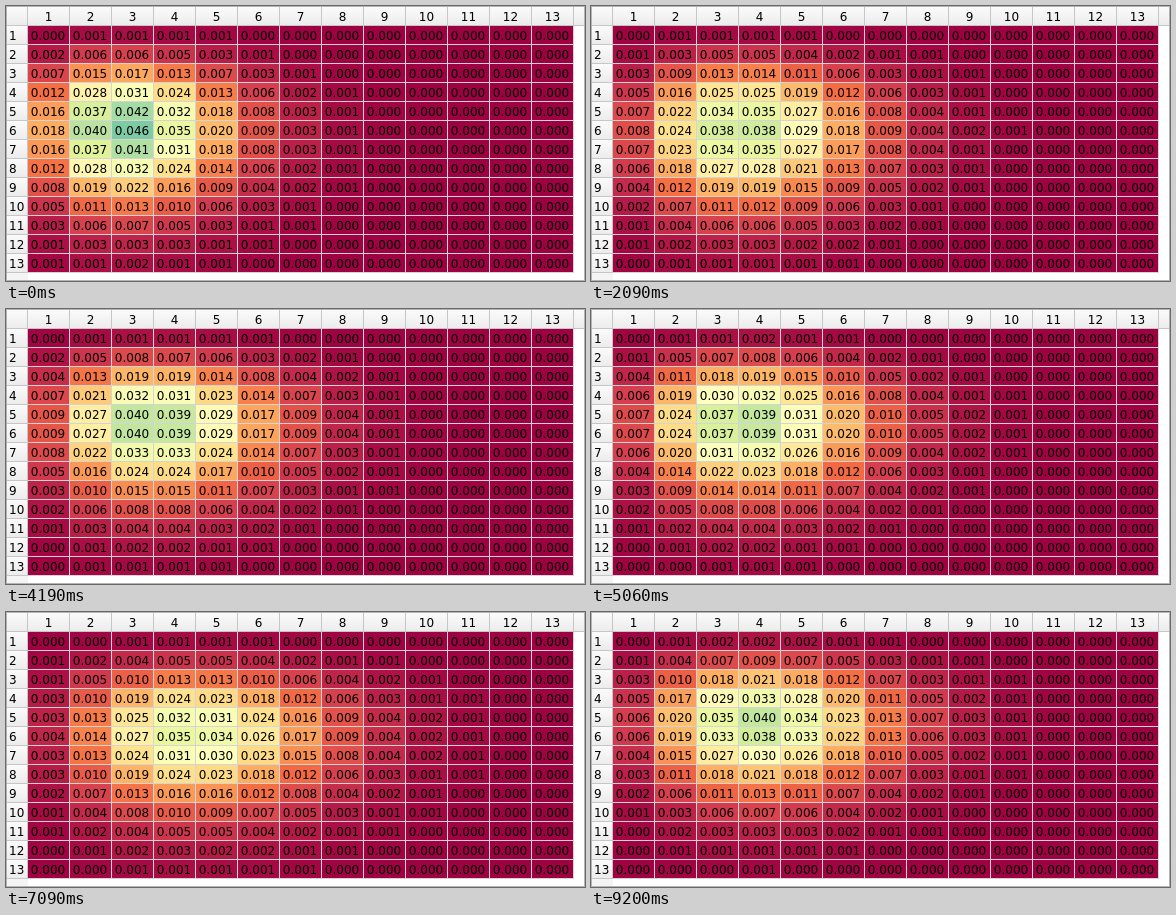
An HTML page with a canvas that plays this animation: 579 px wide and 275 px high, repeating every 9.3 s.

```html
<!DOCTYPE html>
<html lang="en">
<head>
<meta charset="utf-8">
<title>Poisson probability table</title>
<style>
  html, body { margin: 0; width: 579px; height: 275px; overflow: hidden; background: #fff; }
  canvas { display: block; }
</style>
</head>
<body>
<canvas id="stage" width="579" height="275"></canvas>
<script>
const ctx = document.getElementById('stage').getContext('2d');
const W = 579, H = 275, N = 13;
const LEFT = 22, TOP = 20, CELL_W = 42, CELL_H = 19;
const LOOP = 9300, STEP = 46.2, LAST = 199;
const MAX_P = 0.06;

// Means of the two Poisson variables: [step, mean]
const colMean = [[0, 2.27], [23, 2.86], [33, 3.14], [41, 3.1], [50, 3.02], [57, 3.1],
  [65, 2.98], [75, 3.1], [83, 3.01], [90, 2.965], [103, 3.03], [127, 3.55], [139, 4.24],
  [146, 4.24], [153, 3.86], [168, 3.85], [178, 3.55], [187, 3.66], [199, 3.439]];
const rowMean = [[0, 5.41], [23, 5.42], [65, 5.6], [90, 5.02], [127, 4.94], [153, 5.38], [199, 4.8]];

const spectral = ['9e0142', 'd53e4f', 'f46d43', 'fdae61', 'fee08b', 'ffffbf',
  'e6f598', 'abdda4', '66c2a5', '3288bd', '5e4fa2']
  .map(hex => [0, 2, 4].map(i => parseInt(hex.slice(i, i + 2), 16)));

function valueAt(knots, step) {
  const i = Math.max(1, knots.findIndex(k => k[0] >= step));
  const [s0, v0] = knots[i - 1], [s1, v1] = knots[i];
  return v0 + (v1 - v0) * (step - s0) / (s1 - s0);
}

function poisson(mean) {
  const p = [Math.exp(-mean)];
  for (let k = 1; k < N; k++) p.push(p[k - 1] * mean / k);
  return p;
}

function colour(p) {
  const x = Math.min(p / MAX_P, 0.9999) * (spectral.length - 1);
  const i = Math.floor(x), f = x - i;
  return `rgb(${spectral[i].map((c, k) => Math.round(c + (spectral[i + 1][k] - c) * f))})`;
}

function rect(x, y, w, h, fill) {
  ctx.fillStyle = fill;
  ctx.fillRect(x, y, w, h);
}

function text(s, x, y, align) {
  ctx.fillStyle = '#000';
  ctx.textAlign = align;
  ctx.fillText(s, x, y);
}

function header(x, y, w, h) {
  const g = ctx.createLinearGradient(0, y, 0, y + h);
  g.addColorStop(0, '#fbfbfb');
  g.addColorStop(1, '#ebebeb');
  rect(x, y, w, h, g);
  rect(x + w - 1, y, 1, h, '#c6c6c6');
  rect(x, y + h - 1, w, 1, '#c6c6c6');
}

function drawFrame() {
  rect(0, 0, W, H, '#fff');
  rect(1, TOP, LEFT - 1, H - TOP, '#f4f4f4');
  header(1, 1, LEFT - 1, TOP - 1);
  header(LEFT + N * CELL_W, 1, W - LEFT - N * CELL_W, TOP - 1);
  for (let k = 0; k < N; k++) {
    header(LEFT + k * CELL_W, 1, CELL_W, TOP - 1);
    text(k + 1, LEFT + k * CELL_W + 20.5, 15, 'center');
    header(1, TOP + k * CELL_H, LEFT - 1, CELL_H);
    text(k + 1, 3, TOP + k * CELL_H + 14, 'left');
  }
  ctx.strokeStyle = '#b4b4b4';
  ctx.strokeRect(0.5, 0.5, W - 1, H - 1);
}

function draw(now) {
  const step = Math.min(LAST, Math.floor(now % LOOP / STEP));
  const cols = poisson(valueAt(colMean, step));
  const rows = poisson(valueAt(rowMean, step));
  ctx.font = '12px "DejaVu Sans", sans-serif';
  ctx.lineWidth = 1;
  drawFrame();
  rect(LEFT, TOP, N * CELL_W, N * CELL_H, '#d4d4d4');
  rows.forEach((r, i) => cols.forEach((c, j) => {
    const x = LEFT + j * CELL_W, y = TOP + i * CELL_H;
    rect(x, y, CELL_W - 1, CELL_H - 1, colour(r * c));
    text((r * c).toFixed(3), x + 20, y + 14, 'center');
  }));
}

const start = performance.now();
function tick() {
  draw(performance.now() - start);
  requestAnimationFrame(tick);
}
tick();
</script>
</body>
</html>
```
